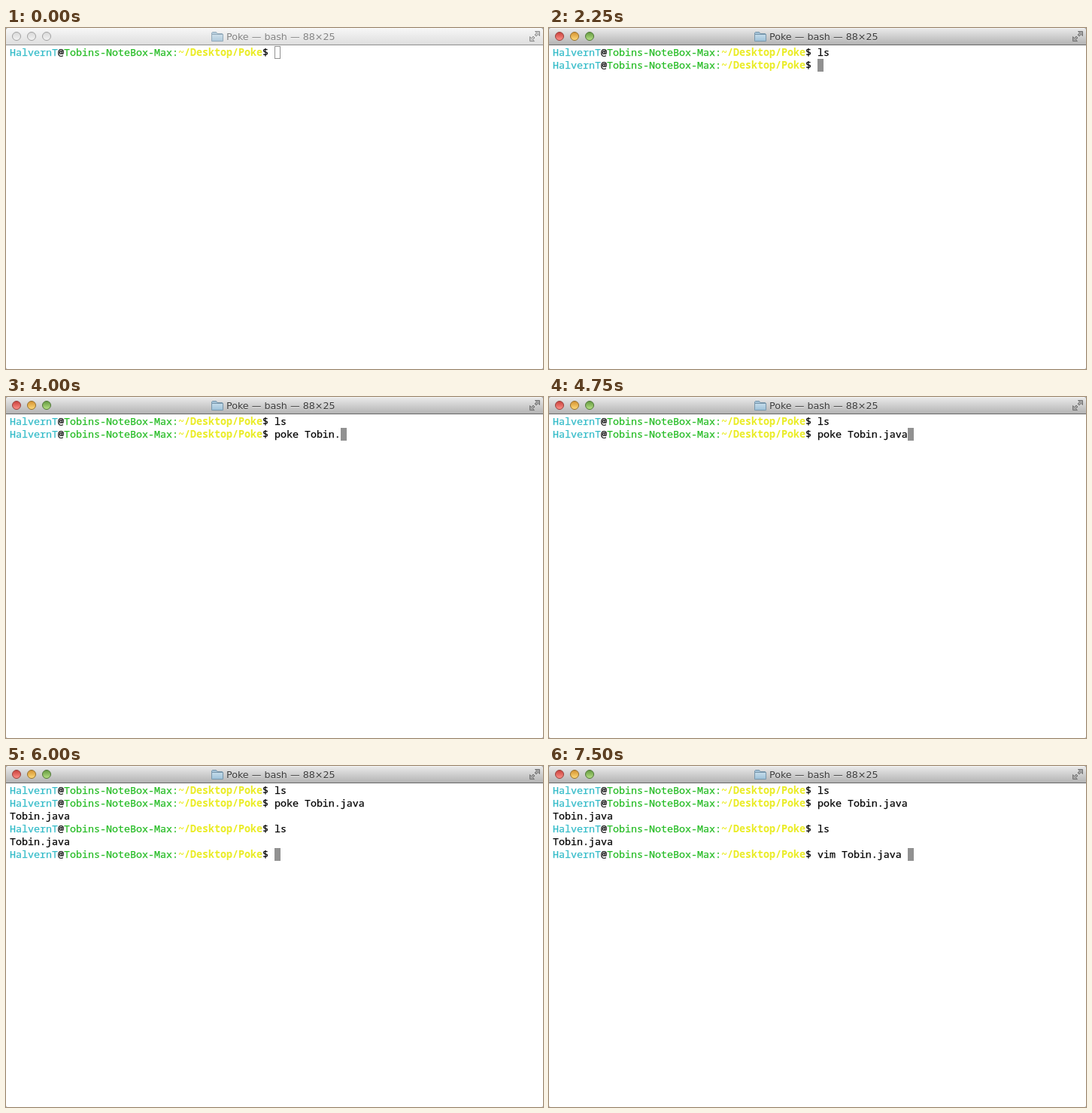
These frames come from a looping animation (714 px wide and 453 px high, 8000 ms). An HTML page:

```html
<!DOCTYPE html>
<html lang="en">
<head>
<meta charset="utf-8">
<title>Terminal</title>
<style>
  html, body { margin: 0; width: 100%; height: 100%; overflow: hidden; background: #a4a7ab; }
  svg { display: block; }
  text { white-space: pre; }
  .title { font: 12.7px "DejaVu Sans", sans-serif; fill: #848484; }
  #term { font: 13.3333px "Noto Sans Mono", monospace; color: #000; }
  #term text, #term tspan { fill: currentColor; stroke: currentColor; stroke-width: .25; }
  #term .user { color: #33bbc8; }
  #term .host { color: #25bc24; }
  #term .path { color: #eaec23; font-weight: 700; stroke: none; }
  .bar { fill: url(#idle); }
  .edge { fill: #8f8f8f; }
  .button { fill: url(#glass); stroke: #a0a0a0; }
  .folder { opacity: .75; }
  .zoom { fill: #c8c8c8; stroke: #8e8e8e; }
  #cursor { fill: #fff; stroke: #919191; }

  .active .title { fill: #3c3c3c; }
  .active .bar { fill: url(#lit); }
  .active .edge { fill: #686868; }
  .active .red { fill: url(#red); stroke: #96423e; }
  .active .amber { fill: url(#amber); stroke: #94702f; }
  .active .green { fill: url(#green); stroke: #4f7539; }
  .active .folder { opacity: 1; }
  .active .zoom { fill: #a2a2a2; stroke: #747474; }
  .active #cursor { fill: #919191; }
</style>
</head>
<body>
<svg id="win" width="714" height="453" viewBox="0 0 714 453">
  <defs>
    <linearGradient id="idle" x2="0" y2="1"><stop stop-color="#f7f7f7"/><stop offset="1" stop-color="#dedede"/></linearGradient>
    <linearGradient id="lit" x2="0" y2="1"><stop stop-color="#ebebeb"/><stop offset="1" stop-color="#b4b4b4"/></linearGradient>
    <linearGradient id="glass" x2="0" y2="1"><stop stop-color="#d8d8d8"/><stop offset="1" stop-color="#f4f4f4"/></linearGradient>
    <linearGradient id="red" x2="0" y2="1"><stop stop-color="#c9403b"/><stop offset="1" stop-color="#ff938a"/></linearGradient>
    <linearGradient id="amber" x2="0" y2="1"><stop stop-color="#d5912f"/><stop offset="1" stop-color="#ffdc7c"/></linearGradient>
    <linearGradient id="green" x2="0" y2="1"><stop stop-color="#62993f"/><stop offset="1" stop-color="#bae386"/></linearGradient>
    <linearGradient id="blue" x2="0" y2="1"><stop stop-color="#c6ddeb"/><stop offset="1" stop-color="#9cc0d8"/></linearGradient>
    <clipPath id="frame"><path d="M0 4a4 4 0 0 1 4-4h706a4 4 0 0 1 4 4v447a2 2 0 0 1-2 2H2a2 2 0 0 1-2-2z"/></clipPath>
  </defs>
  <g clip-path="url(#frame)">
    <rect width="714" height="453" fill="#fff"/>
    <rect class="bar" width="714" height="22"/>
    <rect width="714" height="1" fill="#fff" opacity=".5"/>
    <rect class="edge" y="22" width="714" height="1"/>
    <circle class="button red" cx="14" cy="11" r="5.5"/>
    <circle class="button amber" cx="34" cy="11" r="5.5"/>
    <circle class="button green" cx="54" cy="11" r="5.5"/>
    <g class="folder" stroke="#7896ab">
      <path d="M273.5 17.5v-11l1-1h5l1.5 2h6.5l1 1v9z" fill="#a3c2d7"/>
      <path d="M273.5 8.5h15v8l-1 1h-13l-1-1z" fill="url(#blue)"/>
    </g>
    <text x="293" y="17" class="title" style="fill:#fff;opacity:.45" aria-hidden="true">Poke — bash — 88×25</text>
    <text x="293" y="16" class="title">Poke — bash — 88×25</text>
    <g class="zoom">
      <path id="arrow" d="M703.5 4.5h6v6l-2-2-2.5 2.5-2-2 2.5-2.5z"/>
      <use href="#arrow" transform="rotate(180 703 11)"/>
    </g>
    <rect id="cursor" width="7" height="16"/>
    <g id="term"></g>
  </g>
</svg>
<script>
const LOOP = 8000, FOCUS = 1000, COL = 8, ROW = 17, LEFT = 5, TOP = 24;
const user = 'HalvernT', host = 'Tobins-NoteBox-Max:', path = '~/Desktop/Poke';
const file = 'Tobin.java', prompt = '$ ';
const promptCols = (user + '@' + host + path).length;

// Each step appends its text to the screen.
const steps = [
  [0, prompt],
  [1750, 'ls'], [2250, '\n' + prompt],
  [3250, 'poke'], [3500, ' T'], [3750, 'obin'], [4000, '.'], [4500, 'jav'], [4750, 'a'],
  [5250, `\n${file}\n${prompt}`],
  [5750, 'ls'], [6000, `\n${file}\n${prompt}`],
  [6750, 'vim '], [7250, file + ' ']
];

const win = document.getElementById('win');
const term = document.getElementById('term');
const cursor = document.getElementById('cursor');
const span = (cls, text) => `<tspan class="${cls}">${text}</tspan>`;
const fullPrompt = span('user', user) + '@' + span('host', host) + span('path', path);
let shown;

function drawScreen(screen) {
  const lines = screen.split('\n');
  term.innerHTML = lines.map((line, i) =>
    `<text x="${LEFT}" y="${TOP + 13 + i * ROW}">${line.startsWith(prompt) ? fullPrompt : ''}${line}</text>`
  ).join('');
  const col = promptCols + lines.at(-1).length;
  cursor.setAttribute('x', LEFT + col * COL + .5);
  cursor.setAttribute('y', TOP + (lines.length - 1) * ROW + .5);
}

function tick() {
  const t = performance.now() % LOOP;
  const screen = steps.filter(s => s[0] <= t).map(s => s[1]).join('');
  win.classList.toggle('active', t >= FOCUS);
  if (screen !== shown) drawScreen(shown = screen);
  requestAnimationFrame(tick);
}
tick();
</script>
</body>
</html>
```
